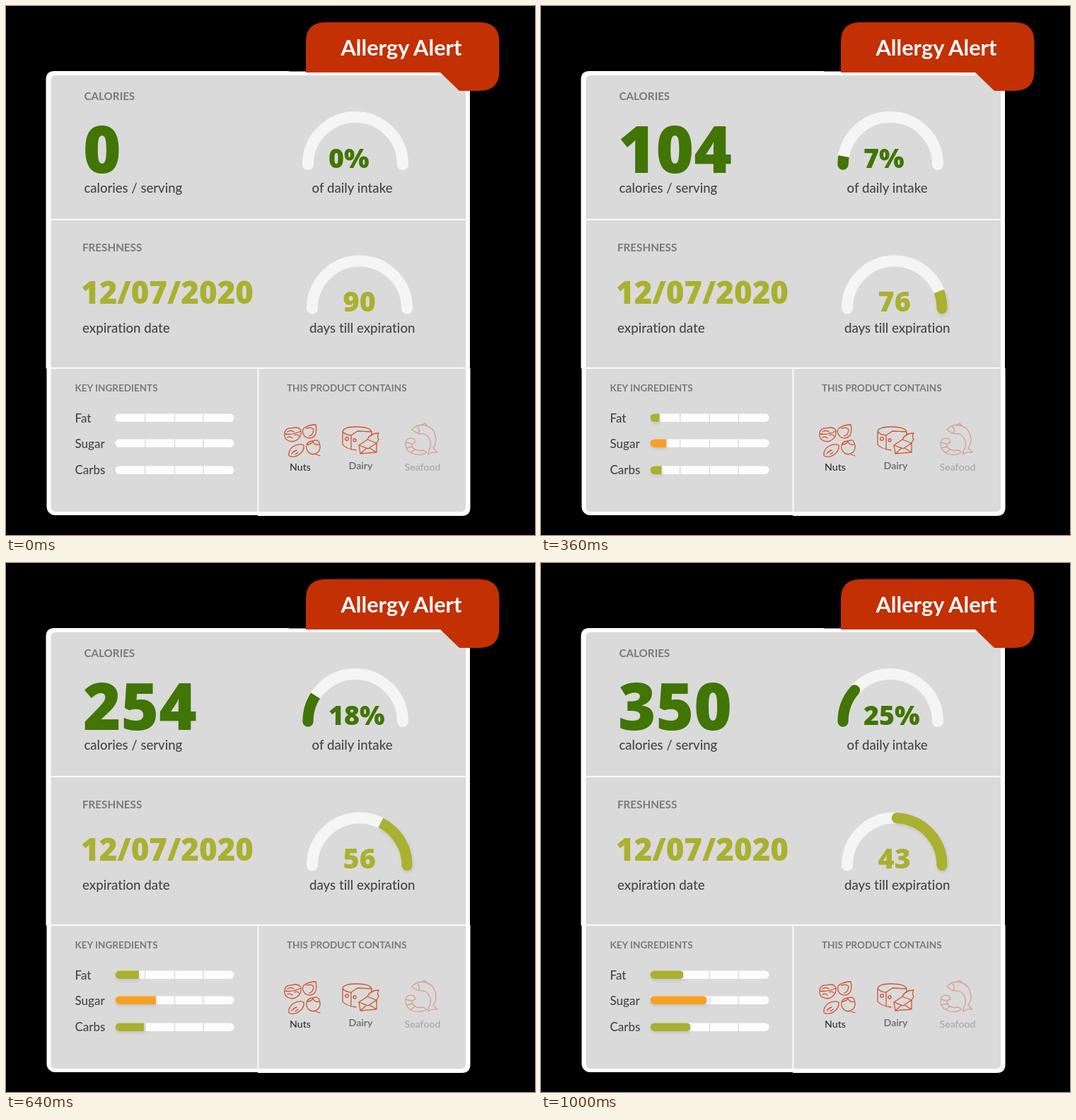
Animation of 748 by 748 pixels, one loop 1040 ms. Source, as an HTML page:

```html
<!DOCTYPE html>
<html lang="en">
<head>
<meta charset="utf-8">
<title>Allergy Alert</title>
<style>
  html, body { margin: 0; width: 100%; height: 100%; overflow: hidden; background: #000; }
  svg { display: block; width: 100vw; height: 100vh; }
  text { font-family: Lato, "Open Sans", sans-serif; fill: #464646; font-variant-ligatures: none; }
  .head { font-weight: 700; fill: #7a7a7a; font-size: 15.2px; }
  .small { font-size: 13.5px; }
  .note { font-weight: 500; font-size: 18.7px; }
  .row { font-weight: 500; font-size: 17px; }
  .item { font-weight: 500; font-size: 14.2px; text-anchor: middle; }
  .num { font-family: "Open Sans", "Noto Sans", sans-serif; font-weight: 800; }
  .green { fill: #417505; }
  .olive { fill: #a9b130; }
  .track, .arc { fill: none; stroke-width: 16; stroke-linecap: round; }
  .track { stroke: #f5f5f5; }
  .arc { stroke-width: 15.4; }
  .icon { fill: none; stroke: #d0552f; stroke-width: 1.3; stroke-linecap: round; stroke-linejoin: round; }
  .soft { filter: drop-shadow(1px 2px 2px rgba(0, 0, 0, .12)); }
</style>
</head>
<body>
<svg viewBox="0 0 748 748">
  <rect width="748" height="748" fill="#000"/>
  <g fill="#fff">
    <rect x="57.500" y="92.500" width="598.500" height="627.500" rx="12"/>
    <path d="M56.500 512V104Q56.500 92 68.500 92H400V512Z"/>
    <path d="M356 512H656.500V709Q656.500 721 644.500 721H356Z"/>
  </g>
  <rect x="63.500" y="98" width="586.500" height="617" rx="6" fill="#dadada"/>
  <path d="M63 302H650M57 512H650M356.500 512V717" stroke="#fafafa" stroke-width="2"/>
  <path d="M424 94V51Q424 23 452 23H669Q697.500 23 697.500 51V92Q697.500 120 669 120H641L614 94Z" fill="#c33003"/>
  <text x="473.500" y="70" font-size="30.800" font-weight="700" style="fill:#fff">Allergy Alert</text>

  <text class="head" x="110.500" y="133">CALORIES</text>
  <text class="num green" id="calories" x="109" y="235.500" font-size="91.500">0</text>
  <text class="note" x="110.500" y="264" style="font-size:18.5px">calories / serving</text>
  <text class="num green" id="percent" x="456" y="228.500" font-size="37.600">0%</text>
  <text class="note" x="432.500" y="264">of daily intake</text>

  <text class="head" x="108" y="347">FRESHNESS</text>
  <text class="num olive" x="106" y="420.500" font-size="43.800">12/07/2020</text>
  <text class="note" x="108" y="461.500">expiration date</text>
  <text class="num olive" id="days" x="476.500" y="431.500" font-size="39.500">90</text>
  <text class="note" x="429" y="461.500">days till expiration</text>

  <text class="head small" x="97.500" y="544.500">KEY INGREDIENTS</text>
  <text class="head small" x="397" y="544.500">THIS PRODUCT CONTAINS</text>
  <text class="row" x="97.500" y="589">Fat</text>
  <text class="row" x="97.500" y="624.500">Sugar</text>
  <text class="row" x="97.500" y="662">Carbs</text>
  <g id="widgets"></g>

  <g class="icon">
    <!-- nuts -->
    <path d="M394 604Q395 596 404 597Q413 594 417 600Q418 609 412 613Q406 618 398 614Q393 611 394 604ZM394 605Q405 607 417 601M398 602Q403 599 407 602M398 610Q402 608 405 611M408 607Q412 605 414 608"/>
    <path d="M438 592Q440 601 437 607Q431 614 423 609Q417 603 421 597Q428 592 438 592ZM425 597Q433 595 435 599Q434 607 429 608"/>
    <path d="M400 636Q399 628 406 623Q414 618 421 621Q422 628 416 633Q408 640 400 636ZM404 633Q407 629 411 628M409 634L413 631"/>
    <path d="M425 621Q427 615 434 615Q442 612 443 618Q446 626 441 631Q433 637 427 630Q424 626 425 621ZM426 620Q431 620 434 616Q437 622 443 620M438 634L444 636"/>
    <!-- dairy -->
    <path d="M476 602Q477 595 495 595Q515 595 517 602V607M476 602V620Q480 626 495 628M476 602Q481 607 488 607L497 601L517 602M488 607V627"/>
    <circle cx="482" cy="612" r="2.300"/><circle cx="493" cy="614" r="2"/>
    <path d="M499 621L511 613L524 618V631L501 633ZM499 621L512 626L524 618M501 633L510 625M524 631L514 625M511 613Q515 604 527 604Q524 609 527 613L524 618"/>
    <!-- seafood -->
    <g opacity=".42">
      <path d="M574 599Q582 590 593 593Q607 597 608 613Q608 620 604 625L610 631Q602 630 597 634Q597 628 600 624Q602 610 591 605Q582 606 574 599ZM587 593L592 590L597 595M582 595Q586 600 583 604"/>
      <path d="M577 612Q567 609 565 617Q564 629 575 633Q586 637 595 631L590 628Q580 630 575 624Q572 618 579 617ZM565 617L573 619M566 625L575 623M572 632L578 627"/>
    </g>
  </g>
  <text class="item" x="416" y="657" style="fill:#333">Nuts</text>
  <text class="item" x="501.500" y="655" style="fill:#6a6a6a;font-weight:600">Dairy</text>
  <text class="item" x="589" y="657" style="fill:#a6a6a6">Seafood</text>
</svg>
<script>
  const LOOP = 1040, STEP = 40;
  const GREEN = "#417505", OLIVE = "#a9b130", ORANGE = "#f8a024";
  const PACE = [[0, 0], [160, .1563], [360, .361], [560, .569], [720, .7418], [840, .8627], [980, 1], [LOOP, 1]];
  const $ = id => document.getElementById(id);
  const widgets = $("widgets");

  function add(parent, tag, attrs) {
    const node = document.createElementNS("http://www.w3.org/2000/svg", tag);
    for (const key in attrs) node.setAttribute(key, attrs[key]);
    return parent.appendChild(node);
  }

  function clipped(id, shape, color) {
    const clip = add(add(widgets, "clipPath", { id }), shape, {});
    const soft = add(widgets, "g", color === GREEN ? {} : { class: "soft" });
    return { clip, group: add(soft, "g", { "clip-path": `url(#${id})` }) };
  }

  // Angles run upwards from the end where the gauge starts; side -1 is left, 1 is right.
  function gauge({ id, cx, cy, side, from, sweep, end, color }) {
    const r = 67;
    const at = (deg, radius) => {
      const a = deg * Math.PI / 180;
      return `${cx + side * radius * Math.cos(a)},${cy - radius * Math.sin(a)}`;
    };
    const arc = deg => `M${at(0, r)}A${r} ${r} 0 0 ${side < 0 ? 1 : 0} ${at(deg, r)}`;
    add(widgets, "path", { class: "track", d: arc(180) });
    const { clip, group } = clipped(id, "polygon", color);
    add(group, "path", { class: "arc", d: arc(end), stroke: color });
    return p => {
      const tip = p === 1 ? end + 12 : from + sweep * p;
      const wedge = [-60, (tip - 60) / 2, tip].map(deg => at(deg, 200));
      clip.setAttribute("points", [`${cx},${cy}`, ...wedge].join(" "));
      group.style.display = p ? "" : "none";
    };
  }

  function bar({ id, y, length, color }) {
    const x = 154.5;
    add(widgets, "rect", { x, y, width: 168, height: 11.5, rx: 5.75, fill: "#fdfdfd" });
    for (const mark of [196.7, 238.5, 279])
      add(widgets, "rect", { x: mark - .75, y, width: 1.5, height: 11.5, fill: "#dcdcdc" });
    const { clip, group } = clipped(id, "rect", color);
    add(group, "rect", { x, y, width: length, height: 11.5, rx: 5.75, fill: color });
    clip.setAttribute("x", x - 1);
    clip.setAttribute("y", y - 1);
    clip.setAttribute("height", 14);
    return p => clip.setAttribute("width", length * p);
  }

  const parts = [
    gauge({ id: "intake", cx: 494, cy: 224, side: -1, from: -6, sweep: 53.5, end: 41, color: GREEN }),
    gauge({ id: "expiry", cx: 500, cy: 427.5, side: 1, from: -8.6, sweep: 99.5, end: 87, color: OLIVE }),
    bar({ id: "fat", y: 576.5, length: 47.5, color: OLIVE }),
    bar({ id: "sugar", y: 612.5, length: 80.5, color: ORANGE }),
    bar({ id: "carbs", y: 650.5, length: 57.5, color: OLIVE })
  ];

  function progress(t) {
    const i = PACE.findIndex(([time]) => time > t);
    const [t0, u0] = PACE[i - 1], [t1, u1] = PACE[i];
    const u = u0 + (u1 - u0) * (t - t0) / (t1 - t0);
    return u * u * (3 - 2 * u);
  }

  function draw(ms) {
    const p = progress(Math.floor((ms % LOOP) / STEP) * STEP);
    $("calories").textContent = Math.round(350 * p);
    $("percent").textContent = Math.round(25 * p) + "%";
    $("days").textContent = Math.round(90 - 47 * p);
    parts.forEach(update => update(p));
  }

  const start = performance.now();
  function tick() {
    draw(performance.now() - start);
    requestAnimationFrame(tick);
  }
  tick();
</script>
</body>
</html>
```
